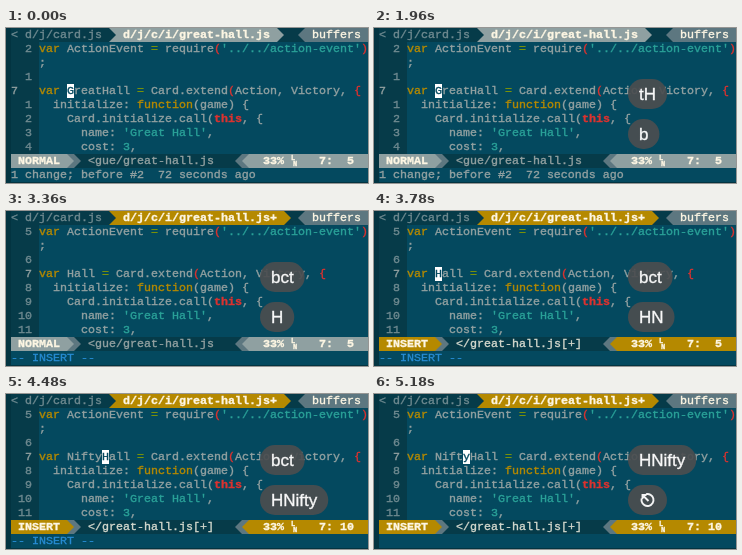
These frames come from a looping animation (362x155 px, 5880 ms). An HTML page with a canvas:

```html
<!DOCTYPE html>
<html lang="en">
<head>
<meta charset="utf-8">
<title>Editing in Vim</title>
<style>
  html, body { margin: 0; width: 100%; height: 100%; overflow: hidden; background: #04495f; }
  canvas { display: block; }
</style>
</head>
<body>
<canvas id="stage" width="362" height="155"></canvas>
<script>
const ctx = document.getElementById('stage').getContext('2d');
const LOOP = 5880, LEFT = 5, CELL = 7, ROW = 14, CODE = 4;
const MONO = '11.665px "Liberation Mono", monospace';
const SANS = '17px "Liberation Sans", Arial, sans-serif';
const C = {
  bg: '#04495f', margin: '#033441', gutter: '#063b49', bar: '#063b49', mid: '#5d7780',
  light: '#8fa0a1', gold: '#b58900', text: '#93a1a1', dim: '#6f8a90', cyan: '#2aa198',
  red: '#dc322f', green: '#859900', blue: '#268bd2', white: '#fdf6e3'
};

// Keystroke groups: [time, label so far]; each group fades a while after its last key.
const groups = [
  [[700, 't'], [980, 'tH']],
  [[1960, 'b'], [2730, 'bc'], [2870, 'bct']],
  [[3290, 'H'], [3780, 'HN'], [3990, 'HNi'], [4130, 'HNif'], [4270, 'HNift'], [4410, 'HNifty']],
  [[5110, '⎋']]
];
const FADE_DELAY = 2100, FADE_STEP = 70;

// Times at which the inserted letters reach the buffer.
const typed = [3850, 3990, 4130, 4270, 4480];
const EDIT = 3360, INSERT = 3430, ESCAPE = 5180;

const colX = col => LEFT + col * CELL;

function fill(col, row, cells, color) {
  ctx.fillStyle = color;
  ctx.fillRect(colX(col), row * ROW, cells * CELL, ROW);
}

// Text with a hairline outline, for the heavier look of smoothed screen type.
function inkText(str, x, y, color) {
  ctx.fillStyle = ctx.strokeStyle = color;
  ctx.lineWidth = 0.35;
  ctx.fillText(str, x, y);
  ctx.strokeText(str, x, y);
}

function write(str, col, row, color = C.text, bold = false) {
  ctx.font = (bold ? 'bold ' : '') + MONO;
  ctx.textAlign = 'left';
  inkText(str, colX(col), row * ROW + 10, color);
}

// Writes [text, color, bold] spans one after another.
function spans(row, col, ...parts) {
  for (const [str, color, bold] of parts) {
    write(str, col, row, color, bold);
    col += str.length;
  }
}

// Powerline triangle filling one cell; dir is 1 for right and -1 for left.
function arrow(col, row, color, dir) {
  const tip = colX(dir > 0 ? col + 1 : col), base = tip - dir * CELL, top = row * ROW;
  ctx.fillStyle = color;
  ctx.beginPath();
  ctx.moveTo(base, top);
  ctx.lineTo(tip, top + ROW / 2);
  ctx.lineTo(base, top + ROW);
  ctx.fill();
}

function drawTabs(edited) {
  const active = edited ? C.gold : C.light;
  const end = edited ? 39 : 38;
  fill(0, 0, 51, C.bar);
  write('< d/j/card.js', 0, 0, C.dim);
  fill(14, 0, end - 14, active);
  arrow(14, 0, C.bar, 1);
  write('d/j/c/i/great-hall.js' + (edited ? '+' : ''), 16, 0, C.white, true);
  arrow(end, 0, active, 1);
  arrow(41, 0, C.mid, -1);
  fill(42, 0, 9, C.mid);
  write('buffers', 43, 0, C.white);
}

function drawCode(name, edited) {
  const numbers = edited ? [5, '', 6, 7, 8, 9, 10, 11] : [2, '', 1, 7, 1, 2, 3, 4];
  ctx.fillStyle = C.gutter;
  ctx.fillRect(LEFT, ROW, 4 * CELL, 8 * ROW);
  numbers.forEach((n, i) => {
    const current = i === 3;
    const label = current && !edited ? String(n) : String(n).padStart(3);
    write(label, 0, i + 1, current ? C.text : C.dim);
  });
  spans(1, CODE, ['var', C.gold], [' ActionEvent '], ['=', C.green], [' require'], ['(', C.red],
    ["'../../action-event'", C.cyan], [')', C.red]);
  write(';', CODE, 2);
  spans(4, CODE, ['var', C.gold], [` ${name} `], ['=', C.green], [' Card.extend'], ['(', C.red],
    ['Action, Victory, '], ['{', C.red]);
  spans(5, CODE + 2, ['initialize: '], ['function', C.gold], ['(game) {']);
  spans(6, CODE + 4, ['Card.initialize.call('], ['this', C.red, true], [', {']);
  spans(7, CODE + 6, ['name: '], ["'Great Hall'", C.cyan], [',']);
  spans(8, CODE + 6, ['cost: '], ['3', C.cyan], [',']);
}

function drawStatus(insert, column) {
  const main = insert ? C.gold : C.light;
  fill(0, 9, 51, C.bar);
  fill(0, 9, 8, main);
  write(insert ? 'INSERT' : 'NORMAL', 1, 9, C.white, true);
  fill(8, 9, 1, C.mid);
  arrow(8, 9, main, 1);
  arrow(9, 9, C.mid, 1);
  write(insert ? '</great-hall.js[+]' : '<gue/great-hall.js', 11, 9, insert ? '#d5d9ce' : C.text);
  arrow(32, 9, C.mid, -1);
  fill(33, 9, 1, C.mid);
  arrow(33, 9, main, -1);
  fill(34, 9, 17, main);
  write('33%', 36, 9, C.white, true);
  ctx.font = 'bold 7px "Liberation Mono", monospace';
  inkText('L', colX(40), 132, C.white);
  inkText('N', colX(40) + 2, 138, C.white);
  write('7:' + String(column).padStart(3), 44, 9, C.white, true);
}

function drawCursor(name, index) {
  fill(CODE + 4 + index, 4, 1, '#ffffff');
  write(name[index], CODE + 4 + index, 4, C.bg);
}

function drawEscape(x, y) {
  ctx.strokeStyle = '#f4f4f4';
  ctx.lineWidth = 1.9;
  ctx.beginPath();
  ctx.arc(x, y, 6, -Math.PI * 0.58, Math.PI * 1.08);
  ctx.moveTo(x + 1, y + 1);
  ctx.lineTo(x - 5, y - 5);
  ctx.moveTo(x - 5, y - 1);
  ctx.lineTo(x - 5, y - 5);
  ctx.lineTo(x - 1, y - 5);
  ctx.stroke();
}

function drawPill(label, y, alpha) {
  const escape = label === '⎋';
  ctx.font = SANS;
  const width = (escape ? 17 : ctx.measureText(label).width) + 22;
  ctx.globalAlpha = alpha;
  ctx.fillStyle = 'rgba(75, 78, 80, 0.92)';
  ctx.beginPath();
  ctx.roundRect(254, y, width, 30, Math.min(width, 30) / 2);
  ctx.fill();
  if (escape) {
    drawEscape(254 + width / 2, y + 15);
  } else {
    ctx.textAlign = 'center';
    inkText(label, 254 + width / 2, y + 21, '#f8f8f8');
  }
  ctx.globalAlpha = 1;
}

function drawPills(t) {
  const started = groups.filter(group => t >= group[0][0]);
  started.forEach((group, i) => {
    const label = group.filter(([time]) => t >= time).pop()[1];
    const age = t - group[group.length - 1][0] - FADE_DELAY;
    const alpha = age < 0 ? 1 : 1 - (Math.floor(age / FADE_STEP) + 1) / 4;
    if (alpha > 0) drawPill(label, 91 - 40 * (started.length - 1 - i), alpha);
  });
}

function draw(t) {
  const edited = t >= EDIT, insert = t >= INSERT;
  const count = typed.filter(time => t >= time).length;
  const name = edited ? 'Nifty'.slice(0, count) + 'Hall' : 'GreatHall';
  const jumped = t >= 980 && t < 1960;
  const cursor = edited ? count - (t >= ESCAPE ? 1 : 0) : jumped ? 4 : 0;

  ctx.fillStyle = C.margin;
  ctx.fillRect(0, 0, 362, 155);
  ctx.fillStyle = C.bg;
  ctx.fillRect(LEFT, 0, 357, 11 * ROW);
  drawTabs(edited);
  drawCode(name, edited);
  drawStatus(insert, 5 + (edited ? count : cursor));
  if (!edited || insert) drawCursor(name, cursor);
  if (!edited) write('1 change; before #2  72 seconds ago', 0, 10);
  else if (t < ESCAPE) write('-- INSERT --', 0, 10, C.blue);
  drawPills(t);
}

function tick() {
  draw(performance.now() % LOOP);
  requestAnimationFrame(tick);
}
tick();
</script>
</body>
</html>
```
